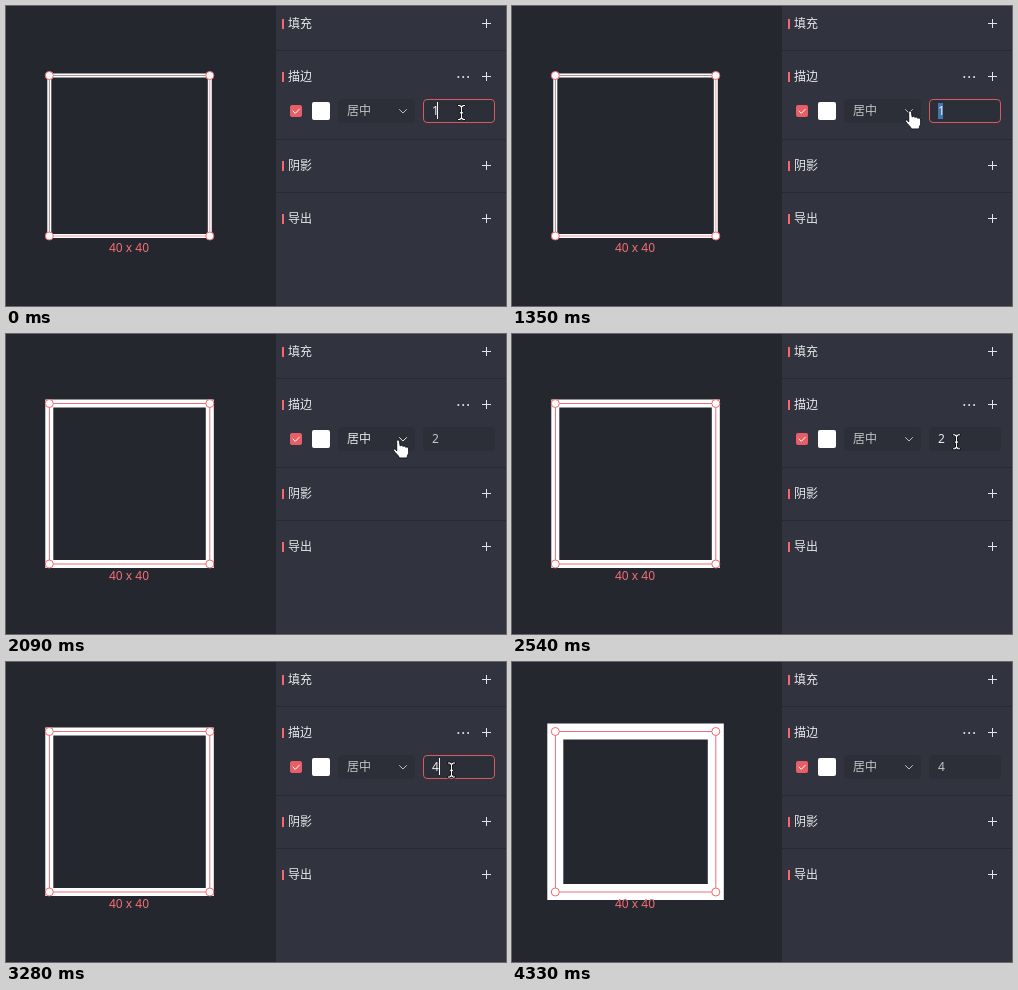
These frames come from a looping animation (500x300 px, 4780 ms). An HTML page:

```html
<!DOCTYPE html>
<html lang="zh-CN">
<head>
<meta charset="utf-8">
<title>描边</title>
<style>
  html, body { margin: 0; width: 100%; height: 100%; overflow: hidden; background: #25272f; }
  svg { display: block; width: 500px; height: 300px; }
  text { font: 12px "Noto Sans CJK SC", "Noto Sans CJK", sans-serif; fill: #e9e9eb; }
  .latin { font-family: "Noto Sans", "Open Sans", sans-serif; }
  .line { fill: none; stroke: #e4e5e8; }
  .cursor { fill: #fff; stroke: #15161a; stroke-linejoin: round; }
  .dim { opacity: .8; }
</style>
</head>
<body>
<svg viewBox="0 0 500 300">
  <rect width="500" height="300" fill="#25272f"/>
  <rect x="270" width="230" height="300" fill="#31343f"/>
  <g id="sections"></g>

  <g fill="#e4e5e8">
    <circle cx="452.3" cy="71" r="1"/><circle cx="457.2" cy="71" r="1"/><circle cx="462.1" cy="71" r="1"/>
  </g>
  <rect x="284" y="99" width="12" height="12" rx="2" fill="#e65f67"/>
  <path class="line" d="M286.7 104.8 289.3 107.4 293.6 102.8" style="stroke:#fff"/>
  <rect x="306" y="96" width="18" height="18" rx="2" fill="#fff"/>

  <rect x="332" y="93" width="77" height="24" rx="4" fill="#2c2f38"/>
  <g id="align">
    <text x="341" y="109.4">居中</text>
    <path class="line" d="M393.2 103.3 397 107 400.8 103.3"/>
  </g>

  <rect x="417" y="93" width="72" height="24" rx="4" fill="#2c2f38"/>
  <rect id="focus" x="417.5" y="93.5" width="71" height="23" rx="3.5" fill="none" stroke="#d9595f"/>
  <rect id="selection" x="426" y="97" height="16" fill="#4574b0"/>
  <text id="value" class="latin" x="426" y="109.3"></text>
  <rect id="caret" y="96" width="1" height="17" fill="#fff"/>

  <rect id="stroke" x="43.3" y="69.5" width="160.5" height="160.5" fill="none" stroke="#fff"/>
  <path id="guideA" fill="none" d="M43.4 230V69.5H203.8"/>
  <path id="guideB" fill="none" d="M203.8 69.5V230H43.4"/>
  <g id="handles" fill="#fff" stroke="#ef6a70"></g>
  <text class="latin" x="123" y="246" text-anchor="middle" style="fill:#f26d74">40 x 40</text>

  <path id="beam" class="cursor" stroke-width="1"
    d="M-4 -8H-1.6L0 -7 1.6 -8H4V-6H2L1 -5.2V-.6H2.2V1.2H1V5.2L2 6H4V8H1.6L0 7 -1.6 8H-4V6H-2L-1 5.2V1.2H-2.2V-.6H-1V-5.2L-2 -6H-4Z"/>
  <path id="hand" class="cursor" stroke-width="1"
    d="M4.2 12V3.2C3.6 .4 6.6 .2 7 2.6L7.7 7C8.4 6 10 6.2 10.4 7.4 11.4 6.6 12.8 7 13.1 8.2 14.5 7.6 16.2 8.3 16.2 10V13.2C16.2 15 14.8 16.2 14.6 19H6.8C6.3 16.4 3.2 14.8 1.2 11.6 .4 9.8 2.4 9.4 3.2 10.6Z"/>
</svg>
<script>
const LOOP = 4780;
const UNIT = 4;
const $ = id => document.getElementById(id);
const caretX = { 1: 431, 2: 433, 4: 433 };

// Each step lists only what changes at its time.
const steps = [
  { at: 0, width: 1, value: 1, focus: true, caret: true, selected: false,
    alignHover: false, valueHover: true, beam: [455.5, 106.5], hand: null },
  { at: 750, caret: false },
  { at: 1200, caret: true },
  { at: 1350, caret: false, selected: true, beam: null, hand: [392.5, 104] },
  { at: 1500, alignHover: true, hand: [386.5, 105] },
  { at: 1800, value: 2, caret: true, selected: false },
  { at: 2090, width: 2, focus: false, caret: false, valueHover: false },
  { at: 2540, alignHover: false, valueHover: true, hand: null, beam: [444.5, 107.8] },
  { at: 2690, beam: [445.5, 108] },
  { at: 2830, focus: true, selected: true },
  { at: 3280, value: 4, caret: true, selected: false },
  { at: 3580, width: 4, focus: false, caret: false },
  { at: 4180, beam: [450.5, 113.5] },
  { at: 4330, beam: null, valueHover: false }
];

[['填充', 18], ['描边', 71], ['阴影', 160], ['导出', 213]].forEach(([label, y], i) => {
  const divider = i ? `<rect x="270" y="${y - 27}" width="230" height="1" fill="#282a33"/>` : '';
  $('sections').innerHTML += `${divider}
    <rect x="276" y="${y - 5}" width="2" height="10" fill="#f9666d"/>
    <text x="282" y="${y + 4.4}">${label}</text>
    <path class="line" d="M476 ${y - .5}h9M480.5 ${y - 5}v9"/>`;
});

for (const x of [43.3, 203.8])
  for (const y of [69.5, 230])
    $('handles').innerHTML += `<circle cx="${x}" cy="${y}" r="4"/>`;

const show = (el, on) => el.setAttribute('visibility', on ? 'visible' : 'hidden');

function place(el, pos) {
  show(el, pos);
  if (pos) el.setAttribute('transform', `translate(${pos})`);
}

function draw(s) {
  const thin = s.width === 1;
  $('stroke').setAttribute('stroke-width', s.width * UNIT);
  $('guideA').setAttribute('stroke', thin ? '#a3918f' : '#ef7076');
  $('guideB').setAttribute('stroke', thin ? '#f59ca1' : '#ef7076');

  $('value').textContent = s.value;
  $('value').classList.toggle('dim', !s.valueHover && !s.focus);
  $('align').classList.toggle('dim', !s.alignHover);
  $('caret').setAttribute('x', caretX[s.value]);
  $('selection').setAttribute('width', caretX[s.value] - 426);
  show($('caret'), s.caret);
  show($('selection'), s.selected);
  show($('focus'), s.focus);
  place($('beam'), s.beam);
  place($('hand'), s.hand);
}

const start = performance.now();
let shown = -1;

function tick() {
  const time = (performance.now() - start) % LOOP;
  const past = steps.filter(step => step.at <= time);
  if (past.length !== shown) {
    shown = past.length;
    draw(Object.assign({}, ...past));
  }
  requestAnimationFrame(tick);
}
tick();
</script>
</body>
</html>
```
